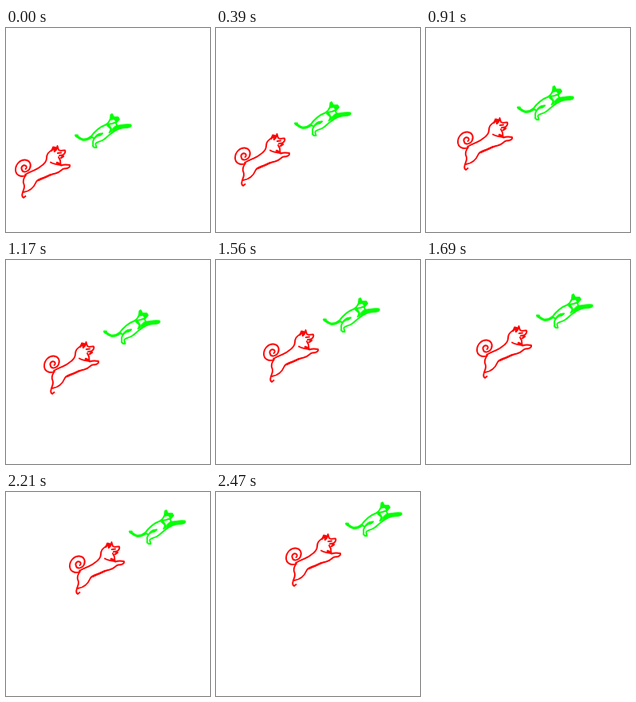
An HTML page with a canvas for the animation above (2.6 s loop, 256 px wide and 256 px high).

```html
<!DOCTYPE html>
<html lang="en">
<head>
<meta charset="utf-8">
<title>Leaping dog and cat</title>
<style>
  html, body { margin: 0; width: 100%; height: 100%; overflow: hidden; background: #fff; }
  canvas { display: block; width: 256px; height: 256px; }
</style>
</head>
<body>
<canvas id="stage" width="256" height="256"></canvas>
<script>
const ctx = document.getElementById('stage').getContext('2d');
const STEP = 130, STEPS = 20, DX = 4, DY = -5;

const line = (d, width = 1.9) => ({ path: new Path2D(d), width });
const patch = d => ({ path: new Path2D(d), width: 0.8, fill: true });

const dog = [
  // tail
  line('M25 185C18 188 12 184 12 178C12 171 18 165 24 165.5C30 166 32 171 30 176C28 181 21 182 20 178C18 174 22 171 25 173C26 174 26 176 24.5 177'),
  // back and head
  line('M24 184C30 180 37 179 43 174C48 171 51 168 51 163C51 158 54 155 58 153L59 149.5L62 150L62 154M63 153L64.5 148L66 153C69 155 71 153 74 153.5C75 155 74 158 71 159.5L67 160'),
  line('M57 154L60 150L61 155M65 157L69 156.5M70 160L72 161L69 163', 2.2),
  // chest and forelegs
  line('M66 162L68 166L68.5 171M56 168.5C60 171 64 171.5 69 172'),
  line('M64 169L68 171', 2.6),
  line('M69 172.5C73 171 77 171.5 80 172C81 175 77 176.5 73 176.5C69 177 69 181 62 182.5C57 183 53 186 49 187.5C43 189 39 191 38 193C35 200 31 205 22 206'),
  line('M41 191L56 184', 2.4),
  // hind leg
  line('M24 186C22 189 21 193 22.5 196C24 200 22 203 21 206C20 209 20 212 22 213L24.5 211')
];

const cat = [
  // tail
  line('M88 135.5C90 136 92 139 96 140C101 141 104 139 107 136.5', 3.2),
  line('M87 134.5L90 134.5'),
  // back and head
  line('M106 137C111 130 118 124 125 121.5C129 119 130 117 131 114L131.5 109L133 108L135 112L140.5 112L142 114.5L139 118L133 120L128 121'),
  patch('M131 115L132 108.5L135 112L141 112L141 116L138 118L136 115Z'),
  // foreleg and belly
  line('M138 119L139 122.5C145 122.5 149 120.5 156.5 121.5C158 124 154 125 149 125C142 125 136 129 131 133C127 136 125 139 121 141C117 143 114 143 112.5 145'),
  patch('M137 123L149 121.5L157 122L155 124.5L148 125L140 126L134 130L133 127Z'),
  patch('M126 122L129 121L132 125L133 130L129 132L131 127Z'),
  // hind leg
  line('M121 132.5C116 132 112 136 110 140C108 143 110 145 109 148L111 150L113.5 150L112.5 146'),
  patch('M112 138L116 133L122 132L119 135L115 136Z'),
  line('M107 137L110 138')
];

function draw(shapes, color) {
  ctx.strokeStyle = ctx.fillStyle = color;
  for (const s of shapes) {
    ctx.lineWidth = s.width;
    if (s.fill) ctx.fill(s.path);
    ctx.stroke(s.path);
  }
}

function render(time) {
  const n = Math.floor(time / STEP) % STEPS;
  ctx.setTransform(1, 0, 0, 1, 0, 0);
  ctx.fillStyle = '#fff';
  ctx.fillRect(0, 0, 256, 256);
  ctx.translate(n * DX, n * DY);
  ctx.lineCap = ctx.lineJoin = 'round';
  draw(dog, '#f00');
  draw(cat, '#0f0');
}

const start = performance.now();
function tick() {
  render(performance.now() - start);
  requestAnimationFrame(tick);
}
tick();
</script>
</body>
</html>
```
